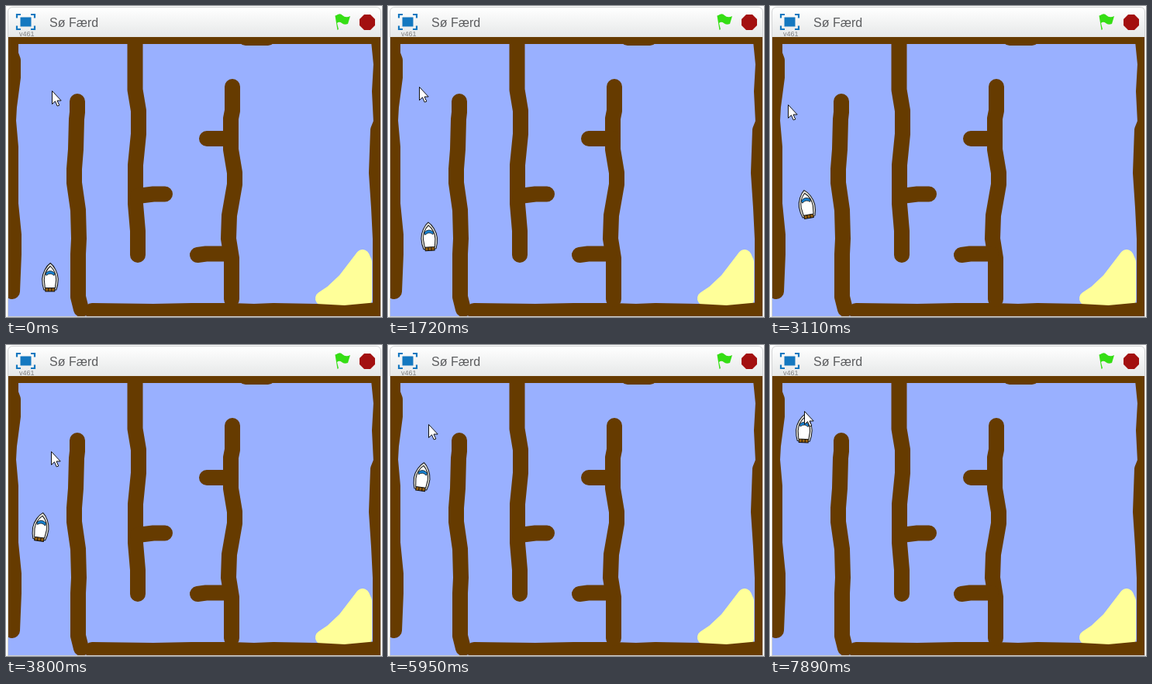
These frames come from a looping animation (485 px wide and 401 px high, 8 s). An HTML page:

```html
<!DOCTYPE html>
<html lang="da">
<head>
<meta charset="utf-8">
<title>Sø Færd</title>
<style>
  html, body { margin: 0; width: 100%; height: 100%; overflow: hidden; background: #fff; }
  svg { display: block; width: 485px; height: 401px; }
  text { font-family: "Liberation Sans", Arial, sans-serif; }
  .walls { fill: none; stroke: #663b00; stroke-width: 20; stroke-linecap: round; stroke-linejoin: round; }
</style>
</head>
<body>
<svg viewBox="0 0 485 401">
  <defs>
    <linearGradient id="bar" gradientUnits="userSpaceOnUse" x1="0" y1="2" x2="0" y2="40">
      <stop stop-color="#fff"/>
      <stop offset="1" stop-color="#e6e8e8"/>
    </linearGradient>
    <clipPath id="stage"><path d="M3 40H483V400H3Z"/></clipPath>
  </defs>

  <path d="M2.500 401V8Q2.500 1.500 9 1.500H477Q483.500 1.500 483.500 8V401" fill="url(#bar)" stroke="#d0d1d2"/>
  <path d="M2 400.500H484" stroke="#d0d1d2"/>

  <g fill="none" stroke="#1478c0" stroke-width="2.200">
    <path d="M14 15.500V11H19M32 11H37V15.500M37 25.500V30H32M19 30H14V25.500"/>
    <rect x="18.500" y="14.500" width="14" height="12" fill="#1478c0" stroke="none"/>
  </g>
  <text x="56" y="27" font-size="16" fill="#5c5d5f">Sø Færd</text>
  <text x="17" y="39" font-size="9" fill="#808080">v461</text>
  <path d="M424.500 12.500L426 12Q431 8.500 434 12Q438 16 444 13L441 23Q436 25 433 22Q430 19.500 427 22L429 30L427.500 31Z" fill="#35de14"/>
  <path d="M462 11H470L476 17V25L470 31H462L456 25V17Z" fill="#a31010"/>

  <g clip-path="url(#stage)">
    <rect x="3" y="40" width="480" height="360" fill="#99b0ff"/>
    <path d="M460 323L447 340L437 353L420 369L408 377L463 379V330Z"
      fill="#ff9" stroke="#ff9" stroke-width="18" stroke-linejoin="round"/>
    <g class="walls">
      <path d="M3 39H483M309 41H338"/>
      <path d="M481 45L484 75L482 110L484 150L480 160L478 215L481 260L483 300V385"/>
      <path d="M111 393L190 394L240 393H290L320 394L345 393L400 394L437 396L480 392"/>
      <path d="M6 45V62L9 70V92L4 130L3 148L6 182V255L10 295V320L8 368"/>
      <path d="M92 123V137L91 146L90 185L88 210V228L93 263L94 300L93 320V375L97 391"/>
      <path d="M166.500 45V108L171 135V165L167 205V255L170 290V321"/>
      <path d="M292 104V135L290 145V185L295 215V230L288 270L287 300L291 325V378"/>
      <path d="M170 245L190 242.500H205M259 171H290M247 321L258 319.500H285"/>
    </g>
  </g>

  <g id="boat" stroke="#111" stroke-linejoin="round">
    <path d="M0 -18.500C5 -15 10 -6 10.300 2Q10.300 10 8 16H-8Q-10.300 10 -10.300 2C-10 -6 -5 -15 0 -18.500Z" fill="#e2e2dc"/>
    <path d="M-6 13H6V18H-6Z" fill="#96600f"/>
    <path d="M-2 14V18M2 14V18" fill="none"/>
    <path d="M0 -14.500C4 -11 7.500 -5 7.700 3L6.500 13.500H-6.500L-7.700 3C-7.500 -5 -4 -11 0 -14.500Z" fill="#fff"/>
    <path d="M-6 -5.500Q0 -11.500 6 -5.500L5 -2.500Q0 -7 -5 -2.500Z" fill="#1680d0" stroke-width=".7"/>
  </g>
  <path id="cursor" d="M.5 .5V17.500L4.500 13.800L7.200 20L9.800 19L7 13H12.200Z" fill="#fff" stroke="#111"/>
</svg>
<script>
const LOOP = 8000;
const boat = document.getElementById('boat');
const cursor = document.getElementById('cursor');

// Turning points of the pointer: [time, x, y]
const turns = [
  [0, 60, 110], [1200, 25, 107], [2150, 53, 104], [3100, 24, 128],
  [3800, 59, 138], [4500, 25, 130], [5000, 60, 114], [5500, 26, 114],
  [5950, 56, 102], [6760, 33, 98], [7300, 48, 90], [LOOP, 45, 86]
];

const ease = k => (1 - Math.cos(Math.PI * Math.min(k, 1))) / 2;
const mix = (a, b, k) => a + (b - a) * k;

// The picture updates in steps that grow slightly longer.
const stepStart = i => 130 * i + 0.147 * i * i;

function stepTime(now) {
  let i = 0;
  while (stepStart(i + 1) <= now) i++;
  return stepStart(i);
}

function pointerAt(t) {
  const next = turns.findIndex(turn => turn[0] > t);
  const [t0, x0, y0] = turns[next - 1];
  const [t1, x1, y1] = turns[next];
  const k = ease((t - t0) / (t1 - t0));
  return [Math.round(mix(x0, x1, k)), Math.round(mix(y0, y1, k))];
}

function draw() {
  const t = stepTime(performance.now() % LOOP);
  const x = mix(57, 44, ease(t / 4600));
  const y = 350 - t * 0.0307;
  const [px, py] = pointerAt(t);
  // The bow follows the pointer.
  const heading = Math.atan2(px - x, y - py) * 180 / Math.PI;
  boat.setAttribute('transform', `translate(${x} ${y}) rotate(${heading})`);
  cursor.setAttribute('transform', `translate(${px - 1} ${py - 1})`);
  requestAnimationFrame(draw);
}
draw();
</script>
</body>
</html>
```
